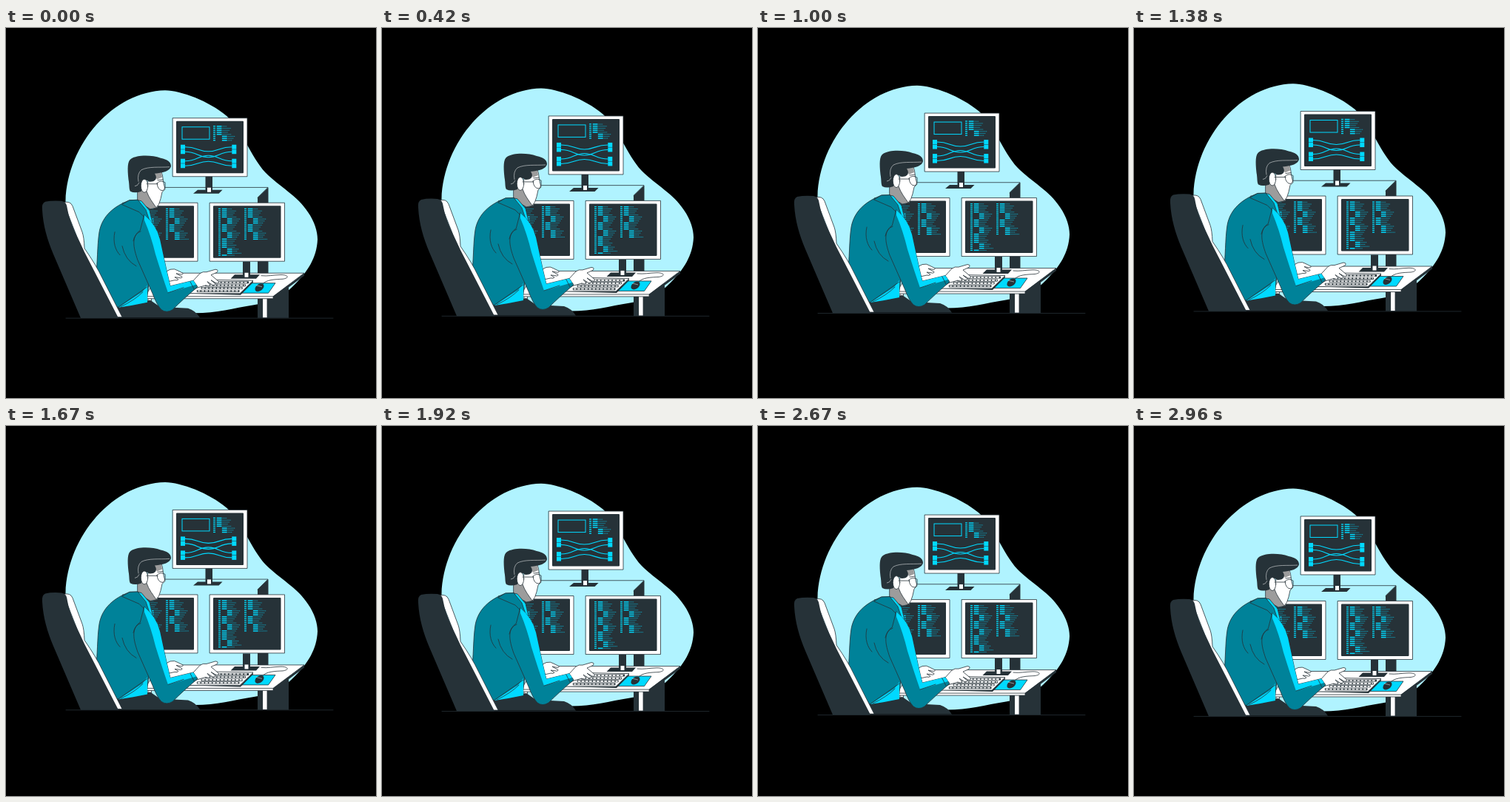
An HTML page that plays this animation: 500x500 px, repeating every 3 s.

```html
<!DOCTYPE html>
<html lang="en">
<head>
<meta charset="utf-8">
<title>Developer at work</title>
<style>
html, body { margin: 0; width: 100%; height: 100%; overflow: hidden; background: #000; }
svg { display: block; width: 100vw; height: 100vh; }
.dark { fill: #263238; }
.cyan { fill: #00d9ff; }
.teal { fill: #008299; }
.white { fill: #fff; }
.edge { stroke: #263238; stroke-width: .8; stroke-linejoin: round; stroke-linecap: round; }
.line { fill: none; }
.glow { fill: none; stroke: #00d9ff; }
</style>
</head>
<body>
<svg viewBox="0 0 500 500">
<g id="scene">
  <path fill="#b0f3ff" d="M215 84.600C237 85 274 99 298 119C320 138 329 172 351 196C370 215 394 227 408 249C417 262 421 275 421 286C420 311 407 330 391 346C375 363 357 371 335 374.500C307 379 285 385.500 255 385.500C200 386 142 362 112 322C92 296 80 262 80.500 234C83 157 145 86 215 84.600Z"/>

  <!-- shelf -->
  <path class="edge line" d="M200 215.700H354L340 229.500"/>
  <path class="dark" d="M354.500 215.500V333H340V229.500Z"/>

  <g id="monitors"></g>

  <!-- monitor stands -->
  <path class="dark" d="M269.500 201H279V219H292.500L287.500 224H253L259 219H269.500Z"/>
  <path class="white" d="M272 216H277V222H272Z"/>
  <path class="dark" d="M340 366H347V392H340ZM353 364L382 346V392H353Z"/>

  <!-- desk -->
  <path class="white edge" d="M192 366V376L196.500 377V366ZM347 365H353V392H347Z"/>
  <path class="white edge" d="M208 331.500H403L361 363V366H188V363Z"/>
  <path class="edge line" d="M188 363H361"/>
  <path class="dark" d="M403 331.500V335L361 366.500V363Z"/>
  <path class="dark" d="M320 316H330V333.500H343L338 339H303.500L309 333.500H320Z"/>
  <path class="white" d="M322.500 331H327.500V337H322.500Z"/>
  <path class="cyan edge" d="M329 345H364L354.500 358.500H319.500Z"/>
  <path class="edge line" d="M346 347C351 340 364 340 374 339.500C384 338 381 333.500 371 333.800C361 334 354 336 345 335"/>
  <ellipse class="dark" cx="342.500" cy="351" rx="6.800" ry="4.500" transform="rotate(-38 342.500 351)"/>
  <path stroke="#fff" stroke-width=".5" fill="none" d="M338 348L346 350"/>
  <path class="dark" d="M246 357L316 359L334 342V344L317 361L246 359Z"/>
  <path class="white edge" d="M276 340.500L334 341.500L316 359H246Z"/>
  <g id="keys"></g>

  <!-- trousers and far hand -->
  <path class="dark" d="M150 391.500L146 376L195 368L208 377L246 379Q256 382 262 391.500Z"/>
  <path class="white edge" d="M213 331L222 326.500Q228 325 232 328L239 331.500Q240 334 235 333L230 332L238 336.500Q238 339 233 337.500L228 337L233 340Q232 342 228 341L219 343Z"/>

  <!-- head -->
  <path fill="#9c9c9c" class="edge" d="M178 216L204 208L205 243L195 245L178 235Z"/>
  <path class="white edge" d="M193 203L210 194Q212 200 212.500 208L215 218L211 222L209 231Q207 240 203 243C199 237 193 230 190 221Z"/>
  <path fill="#9c9c9c" d="M200 197L210 194L211 202L204 205Z"/>
  <path class="dark" d="M168 221C166 218 167 213 165.500 205C164 190 164 180 169 177C177 171.500 197 171.500 209 176C218 178 223 181 223 187C222 193 213 196 201 197C205 203 203 208 194 208L190 206C184 207 184 214 183 221Q174 224 168 221Z"/>
  <path fill="none" stroke="#fff" stroke-width=".5" d="M221 188C207 189 193 187 183 192Q177 197 179 208M174 214Q178 214 180 209"/>
  <ellipse class="white edge" cx="187" cy="213.500" rx="4.700" ry="9"/>
  <path class="edge line" d="M190 211H205M204 210Q209 205 215 209Q216 217 212 220Q205 220 204 210M205 206L212 205"/>

  <!-- torso -->
  <path class="teal edge" d="M167 233C146 241 130 254 126 276C123 295 124 318 121 341L151 378C164 376 177 374 190 371L193 346L213 320L204 282L195 258L179 233Z"/>
  <path class="cyan" d="M152 378L184 357L191 348V371Q172 375 152 378Z"/>
  <path class="edge line" d="M155 377Q174 368 185 357M151 378L191 350"/>
  <path class="cyan edge" d="M178 233L183 234L194 247L199 268L188 252Z"/>
  <path class="teal edge" d="M167 233L178 232.500L189 246L195 264L180 249L157 239Z"/>
  <path class="edge line" d="M147 276C144 290 148 301 154 307M157 295Q161 314 176 322"/>

  <!-- chair -->
  <path class="white edge" d="M78 236Q87 233.500 90 241L103 276Q105.500 283 106 298Q122 321 130 338L157 391H148L104 303Z"/>
  <path class="dark" d="M53 235Q48 237 49 246C50 267 56 287 64 306L101 392.300H152L106 303C99 287 86 264 83 245Q82 234.500 75 234Q62 233 53 235Z"/>

  <!-- near arm -->
  <path class="white edge" d="M251 344L262 332Q266 329 271 330L283 326.500Q288 327 285 330.500L277 334L287 342.500Q288 346 284 345L277 341L283 346Q283 348.500 279 347.500L272 343L276 348Q274 350 270 348L256 352Z"/>
  <path class="teal edge" d="M187 253Q203 266 208 286L217 328L222 349L253 341.500L259 350Q239 367 225 381Q217 386 210 381Q204 375 198 359L178 314C172 297 169 282 181 274Z"/>
  <path class="cyan" d="M187 253Q203 266 208 286L217 328L222 349L253 341.500L257 347L219 358Q211 335 202 306Q196 281 187 260Z"/>
  <path class="edge line" d="M172 288Q174 278 182 275M219 358L240 351M249 343L254 353"/>

  <path class="edge line" d="M81 392.400H442"/>
</g>
</svg>
<script>
const byId = id => document.getElementById(id);
const rect = (x, y, w, h, attrs) => `<rect x="${x}" y="${y}" width="${w}" height="${h}" ${attrs}/>`;
const cyan = 'class="cyan"';

// Each digit is one row of code; its value is the indent.
function code(x, y, rows) {
  return [...rows].map((indent, i) => {
    const top = y + i * 2.72, left = x + 4.7 + indent * 7.2;
    const end = left + 14 + (i * 5 % 7);
    return rect(x, top, 3, 1.3, cyan) + rect(left, top, 6.8, 1.5, cyan) +
      `<path class="glow" stroke-width=".9" stroke-dasharray="1.3 .7" opacity=".7" d="M${left + 7.8} ${top + .8}H${end}"/>`;
  }).join('');
}

function monitor(x, y, w) {
  return rect(x, y, w, 79, 'class="white edge"') +
    rect(x + 4.5, y + 4, w - 9.5, 70.5, 'class="dark" rx="1"');
}

function network() {
  const ports = [[161, 6], [167.5, 7.5], [180, -7.5], [186.5, -6]];
  return ports.map(([y, bend]) => {
    const mid = y + bend;
    return rect(236, y - 3, 6, 6, cyan) + rect(305.3, y - 3, 6, 6, cyan) +
      `<path class="glow" stroke-width="1.1" d="M242 ${y}C259 ${y} 259 ${mid} 273.500 ${mid}S288 ${y} 305.500 ${y}"/>`;
  }).join('');
}

const long = '000001110000111000001110', short = '0000011100001111';
byId('monitors').innerHTML =
  monitor(158, 236.5, 101) + code(181, 244, long) + code(216, 244, short) +
  monitor(275.5, 236.5, 101) + code(287, 244, long) + code(322, 244, short) +
  monitor(225.5, 122, 100.5) + rect(238, 134, 37, 16.5, 'class="glow" stroke-width="1"') +
  code(280, 132.3, '00000111') + network();

let keys = '';
for (let row = 0; row < 4; row++) {
  const y = 344 + row * 3.9, left = 275 - row * 5.7, right = 328 - row * 4.2;
  keys += `<path d="M${left} ${y}H${right}" stroke="#263238" stroke-width="3"/>` +
    `<path d="M${left + 1} ${y}H${right - 1}" stroke="#fff" stroke-width="1.7" stroke-dasharray="3.8 1.300"/>`;
}
byId('keys').innerHTML = keys;

// The whole scene floats 10 units up and back at constant speed.
const scene = byId('scene'), period = 3000, lead = 40, start = performance.now();
function draw() {
  const phase = (performance.now() - start + lead) % period / period;
  const lift = 10 * (1 - Math.abs(1 - 2 * phase));
  scene.setAttribute('transform', `translate(0 ${-lift})`);
  requestAnimationFrame(draw);
}
draw();
</script>
</body>
</html>
```
